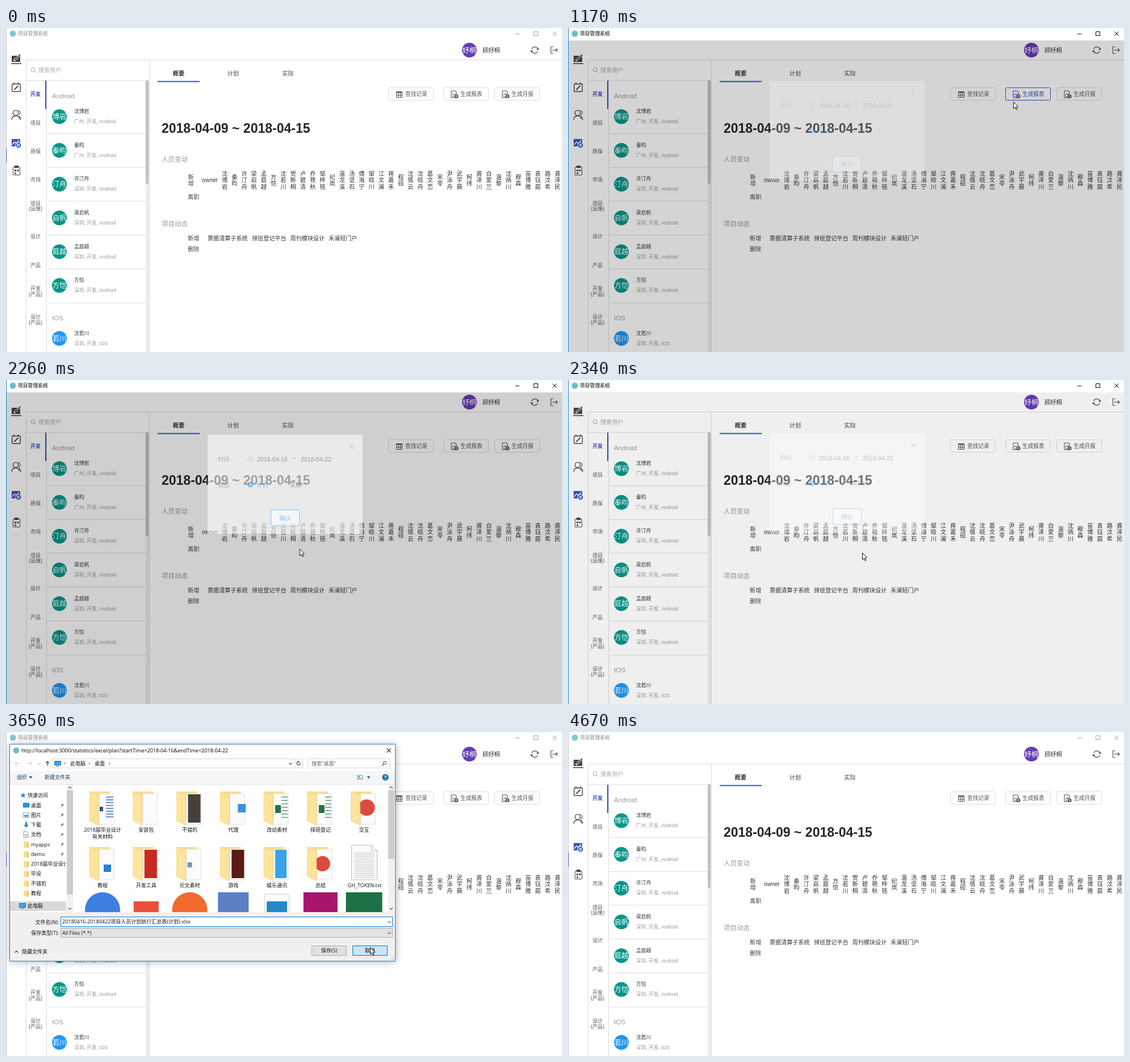
Animation, 979 px wide and 572 px high, one loop 4820 ms. Source, as an HTML page with a canvas:

```html
<!DOCTYPE html>
<html lang="zh-CN">
<head>
<meta charset="utf-8">
<title>项目管理系统</title>
<style>
html, body { margin: 0; width: 100%; height: 100%; overflow: hidden; background: #fff; }
canvas { display: block; }
</style>
</head>
<body>
<canvas id="stage" width="979" height="572"></canvas>
<script>
const LOOP = 4820, W = 979, H = 572;
const g = document.getElementById('stage').getContext('2d');
const CJK = '"Noto Sans CJK SC","Noto Sans CJK",sans-serif';
const APP = '"Liberation Sans",' + CJK, SYS = '"Open Sans",' + CJK;
const INDIGO = '#3f51b5', BLUE = '#409eff', RULE = '#dcdcdc';

// ---- drawing helpers ----
function text(s, x, y, size, color, o = {}) {
  g.font = (o.bold ? 'bold ' : '') + size + 'px ' + (o.font || APP);
  g.textAlign = o.align || 'left';
  g.fillStyle = color;
  g.fillText(s, x, y + size * 0.37);
}
const mid = (s, x, y, size, color, o) => text(s, x, y, size, color, { align: 'center', ...o });
const sys = (s, x, y, color = '#111', align = 'left') => text(s, x, y, 9, color, { font: SYS, align });

function fill(x, y, w, h, color) {
  g.fillStyle = color;
  g.fillRect(x, y, w, h);
}
function frame(x, y, w, h, color, bg, r = 0) {
  g.beginPath();
  g.roundRect(x + 0.5, y + 0.5, w - 1, h - 1, r);
  if (bg) { g.fillStyle = bg; g.fill(); }
  g.lineWidth = 1;
  g.strokeStyle = color;
  g.stroke();
}
function path(pts, stroke, width = 1, bg, close) {
  g.beginPath();
  for (let i = 0; i < pts.length; i += 2) g.lineTo(pts[i], pts[i + 1]);
  if (close || bg) g.closePath();
  if (bg) { g.fillStyle = bg; g.fill(); }
  if (stroke) { g.strokeStyle = stroke; g.lineWidth = width; g.stroke(); }
}
function disc(x, y, r, color) {
  g.beginPath();
  g.arc(x, y, r, 0, 7);
  g.fillStyle = color;
  g.fill();
}
function ring(x, y, r, color, width = 1, a = 0, b = Math.PI * 2) {
  g.beginPath();
  g.arc(x, y, r, a, b);
  g.strokeStyle = color;
  g.lineWidth = width;
  g.stroke();
}
function cross(x, y, r, color, width = 1) {
  path([x - r, y - r, x + r, y + r], color, width);
  path([x + r, y - r, x - r, y + r], color, width);
}
// chevron pointing down (d = 1) or up (d = -1)
const chevron = (x, y, r, color, d = 1) =>
  path([x - r, y - d * r / 2, x, y + d * r / 2, x + r, y - d * r / 2], color, 1.1);
const right = (x, y, color) => path([x - 1, y - 2, x + 1, y, x - 1, y + 2], color);
const caret = (x, y) => path([x - 3, y - 1.5, x + 3, y - 1.5, x, y + 2], null, 1, '#1e395b');

// ---- timing ----
const clamp = v => Math.max(0, Math.min(1, v));
const smooth = v => (v = clamp(v), v * v * (3 - 2 * v));
const tick = (t, a, b, n) =>
  t < a ? -1 : Math.min(n - 1, Math.floor((t - a) / (b - a) * (n - 1) + 0.15));
const opening = t => tick(t, 930, 1410, 7);
const closing = t => tick(t, 2090, 2560, 7);
const saving = t => tick(t, 2650, 3100, 7);

// start, end, steps, step of arrival, from x y, to x y, sag
const LEGS = [
  [70, 550, 7, 6, 876, 367, 784, 130, 0],
  [1480, 1940, 7, 5, 784, 130, 507, 242, 0],
  [2090, 2560, 7, 3, 507, 242, 518, 305, 0],
  [2650, 3100, 7, 2, 518, 305, 503, 319, 0],
  [3190, 3650, 7, 6, 506, 327, 641, 380, 24],
  [3780, 4120, 6, 5, 641, 380, 918, 557, 0],
  [4270, 4440, 3, 2, 918, 562, 918, 576, 0]
];
function pointer(t) {
  const leg = LEGS.filter(l => t >= l[0]).pop();
  if (!leg) return null;
  const [a, b, n, reach, x0, y0, x1, y1, sag] = leg;
  const u = clamp(tick(t, a, b, n) / reach), p = u * (2 - u);
  return { x: x0 + (x1 - x0) * p, y: y0 + (y1 - y0) * p + sag * Math.sin(Math.PI * p) };
}

// ---- application window ----
const NAMES = ('沈博岩 秦昀 许汀舟 梁启帆 孟庭越 方恺 沈若川 贺新桐 卢碧清 乔艳秋 邹梓铭 纪岚 ' +
  '温龙溪 汤坚石 傅海宁 邹晓川 江文澜 蒋嘉禾 程砚 沈倩云 沈晓舟 葛文峦 宋苓 尹泳舟 武宇晨 柯纬 ' +
  '龚泽川 白爱兰 温黎 沈炳川 穆森 苗博雅 袁钰庭 路汶希 龚泽民').split(' ');
const GROUPS = ['开发', '项目', '质保', '市场', '项目 (运维)', '设计', '产品', '开发 (产品)', '设计 (产品)'];

function titleBar(active) {
  const c = active ? '#000' : '#a0a0a0';
  fill(0, 0, W, 22, '#fff');
  disc(12, 10, 5.5, active ? '#6cbcc6' : '#84c6cd');
  text('项目管理系统', 21, 10, 8.8, active ? '#000' : '#888');
  path([897, 10.5, 904, 10.5], c);
  frame(929, 6, 8, 8, c);
  cross(966, 10, 3.7, c);
  fill(0, 0, 1, H, active ? '#1883d7' : '#c8c8c8');
  if (!active) fill(0, 213, 1, 25, INDIGO);
}

function sideIcons() {
  const c = '#444';
  fill(10, 49, 15, 11, c);
  fill(9, 62, 18, 1.6, c);
  path([14, 58, 24, 48], '#fff', 3.5);
  path([15, 57, 25, 47], c, 1.8);

  g.beginPath(); g.roundRect(10.7, 98.7, 14.6, 13.6, 1.5);
  g.strokeStyle = c; g.lineWidth = 1.4; g.stroke();
  path([14, 96, 14, 100], c, 1.4);
  path([22, 96, 22, 100], c, 1.4);
  path([14.5, 109, 21.5, 102], c, 1.8);

  ring(17, 150, 4.6, c, 1.4);
  ring(17, 162, 7, c, 1.4, Math.PI, Math.PI * 1.95);
  ring(20.5, 150, 4.4, c, 1.2, -1.4, 1.3);
  path([22, 155.5, 25, 158, 26, 162], c, 1.3);

  fill(10, 196, 15, 13, INDIGO);
  path([11, 206, 15, 201, 18, 204, 23, 198], '#fff', 1.4);
  disc(22, 207, 5.5, '#fff');
  ring(22, 207, 3.4, INDIGO, 2);
  disc(22, 207, 1, INDIGO);

  frame(12, 245, 13, 15, c, null, 1);
  frame(12, 245, 13, 15, c, null, 1);
  fill(15, 243, 7, 4, c);
  fill(15, 250, 3, 3, c);
  fill(19.5, 250, 3, 3, c);
  fill(15, 255, 3, 2.5, c);
}

function person(y, name, place, color) {
  disc(94, y, 13, color);
  mid(name.slice(-2), 94, y, 12.2, '#fff');
  text(name, 120, y - 9.5, 8.8, '#333');
  text(place, 120, y + 8.5, 8.65, '#999');
}

function report(x, y, c) {
  path([x + 3, y + 6, x - 5, y + 6, x - 5, y - 6, x + 2, y - 6, x + 4, y - 4, x + 4, y], c, 1.1);
  path([x - 3, y + 2, x - 1, y - 1, x, y + 1, x + 2, y - 2], c, 0.9);
  path([x - 3, y + 4, x, y + 4], c, 0.9);
  disc(x + 4, y + 3.5, 3.6, c);
  path([x + 4, y + 5.5, x + 4, y + 2], '#fff', 1);
  path([x + 2.5, y + 3.5, x + 4, y + 1.8, x + 5.5, y + 3.5], '#fff', 0.8);
}
function button(x, w, label, hot, icon) {
  const c = hot ? INDIGO : '#555';
  frame(x, 105, w, 23, hot ? INDIGO : RULE, '#fff', 2);
  text(label, x + 30, 116.5, 9.7, c);
  icon(x + 19, 117, c);
}
function grid(x, y, c) {
  frame(x - 5, y - 5, 11, 11, c);
  fill(x - 5, y - 5, 11, 2.5, c);
  path([x - 5, y + 1.5, x + 6, y + 1.5], c);
  path([x - 1, y - 4, x - 1, y + 5], c);
  path([x + 2.5, y - 4, x + 2.5, y + 5], c);
}

function app(hot) {
  fill(0, 0, W, H, '#fff');
  sideIcons();
  fill(36, 56, W - 36, 1, RULE);
  fill(35, 56, 1, H, RULE);
  fill(36, 92, 216, 1, RULE);
  fill(71, 92, 1, H, RULE);
  fill(252, 56, 1, H, RULE);

  disc(816, 39, 13, '#673ab7');
  mid('妤桐', 816, 39, 12.3, '#fff');
  text('顾妤桐', 839, 39, 10.3, '#333');
  ring(931, 39, 5.7, '#555', 1.2, -2.8, -0.2);
  ring(931, 39, 5.7, '#555', 1.2, 0.35, 2.95);
  path([934, 38.5, 938.5, 38.5, 937.5, 34.5], null, 1, '#555');
  path([928, 39.5, 923.5, 39.5, 924.5, 43.5], null, 1, '#555');
  path([964, 33, 959.5, 33, 959.5, 45, 964, 45], '#555', 1.2);
  path([962, 39, 971, 39], '#555', 1.2);
  path([968, 36, 971, 39, 968, 42], '#555', 1.2);

  ring(47.5, 73.5, 3.4, '#aaa');
  path([50, 76, 53, 79], '#aaa');
  text('搜索用户', 57, 74.5, 10.1, '#aaa');

  GROUPS.forEach((s, i) => {
    const y = 117 + i * 50.2, rows = s.split(' '), c = i ? '#555' : INDIGO;
    if (rows.length < 2) mid(s, 52, y, 9, c, { bold: !i });
    else rows.forEach((r, j) => mid(r, 52, y - 8.5 + j * 9.6, 9, c));
  });
  fill(69, 93, 2, 50, INDIGO);

  text('Android', 81, 120, 11.6, '#999');
  for (let i = 0; i < 6; i++) {
    person(156.5 + i * 59.6, NAMES[i], (i < 2 ? '广州' : '深圳') + ', 开发, Android', '#009688');
    fill(74, Math.round(186 + i * 59.7), 172, 1, RULE);
  }
  text('IOS', 81, 511.5, 11.6, '#999');
  person(548, NAMES[6], '深圳, 开发, IOS', '#2196f3');
  fill(246, 93, 6, H, '#ededed');
  fill(246, 93, 5, 182, '#c1c1c1');

  mid('概要', 304, 80, 10.2, '#333', { bold: true });
  mid('计划', 400, 80, 10.2, '#444');
  mid('实际', 496.5, 80, 10.2, '#444');
  fill(267, 93.5, 74, 2, INDIGO);
  button(673, 80, '查找记录', false, grid);
  button(770, 80, '生成报表', hot, report);
  button(860, 80, '生成月报', false, report);

  text('2018-04-09 ~ 2018-04-15', 274, 176, 23, '#262626', { bold: true });
  text('人员变动', 274, 232, 11.5, '#999');
  mid('新', 325.5, 263, 10.2, '#444');
  mid('增', 325.5, 274, 10.2, '#444');
  text('owner', 345, 268, 10.3, '#333');
  NAMES.forEach((s, i) => [...s].forEach((ch, j) =>
    mid(ch, 385 + i * 17.235, 268.5 + (j - (s.length - 1) / 2) * 11.4, 10.2, '#333')));
  text('离职', 320, 298, 10.2, '#444');

  text('项目动态', 274, 346, 11.5, '#999');
  text('新增', 320, 371, 10.2, '#444');
  text('票据清算子系统', 355, 371, 10.1, '#333');
  text('排班登记平台', 433, 371, 10.1, '#333');
  text('周刊模块设计', 500.5, 371, 10.1, '#333');
  text('禾澜轻门户', 568, 371, 10.1, '#333');
  text('删除', 320, 390, 10.2, '#444');
}

// ---- report popup ----
function popup(alpha, dy) {
  g.save();
  g.globalAlpha = alpha;
  g.translate(0, dy);
  fill(355, 104, 273, 175, '#fff');
  cross(608, 124.5, 3.5, '#909399');
  text('时间', 373, 147, 10.3, '#888');
  ring(430, 147, 4.3, '#b8bcc4');
  path([430, 144.5, 430, 147.5, 432.5, 147.5], '#b8bcc4');
  text('2018-04-16', 442, 147.5, 10.5, '#606266');
  mid('~', 507.5, 145, 10.5, '#606266');
  text('2018-04-22', 519, 147.5, 10.5, '#606266');
  text('类型', 373, 192, 10.3, '#888');
  disc(430, 192, 5, BLUE);
  disc(430, 192, 1.7, '#fff');
  text('计划', 441, 192, 10.3, BLUE);
  ring(489, 192, 4.6, '#dcdfe6');
  text('实际', 500, 192, 10.3, '#606266');
  frame(466, 236, 51, 29, BLUE, '#fff', 3);
  mid('确认', 491.5, 251, 10.3, BLUE);
  g.restore();
}

// ---- save dialog ----
const PLACES = ['桌面', '图片', '下载', '文档', 'myapps', 'demo', '2018届毕业设计', '毕设', '不错的', '教程'];
const FILES = ['2018届毕业设计 有关材料', '安装包', '不错的', '代理', '改动素材', '排班登记', '交互',
  '教程', '开发工具', '论文素材', '游戏', '娱乐通讯', '总结'];
// colour, offset x y, width, height (no height: a disc)
const INSIDE = [['#2b579a', -5, 27, 6, 8], null, ['#4a403b', -3, 5, 22, 50], ['#3f8fdc', 8, 22, 14, 15],
  ['#217346', -3, 24, 10, 14], ['#217346', -3, 24, 10, 14], ['#dd4b3e', -10, 14, 29],
  ['#2b7cd3', 2, 31, 13, 13], ['#c9281f', -3, 5, 22, 50], ['#7b93b5', -4, 27, 8, 9],
  ['#5c1a1a', -3, 5, 22, 50], ['#3aa2ea', -3, 5, 20, 50], ['#dd4b3e', -10, 16, 27]];
const LAST_ROW = [['c', '#3d80df', 31], ['s', '#e8503a', 22], ['c', '#f26a2e', 31], ['s', '#5b80c4', 27],
  ['s', '#2489ca', 18], ['s', '#a8156c', 30], ['s', '#1e7145', 32]];

function folder(cx, y, item) {
  fill(cx - 23, y, 36, 52, '#f7dd92');
  path([cx - 6, y + 4, cx + 20, y + 4, cx + 20, y + 58, cx - 6, y + 58], '#dedede', 1, '#fbfbfb');
  if (item) {
    const [color, dx, dy, w, h] = item;
    if (h) fill(cx + dx, y + dy, w, h, color);
    else disc(cx + dx + w / 2, y + dy + w / 2, w / 2, color);
  }
  path([cx - 23, y, cx - 7, y + 8, cx - 7, y + 60, cx - 23, y + 52], '#f2cf72', 0.6, '#fce49b');
}
// rows of text on a sheet
function lines(x, y, n, gap, w, color) {
  for (let j = 0; j < n; j++) fill(x, y + j * gap, w, 1.5, color);
}
function page(x, y) {
  path([x - 4, y - 5.5, x + 1, y - 5.5, x + 4, y - 2.5, x + 4, y + 5.5, x - 4, y + 5.5], '#999', 1, '#fff');
}
function computer(x, y) {
  frame(x - 6, y - 5, 12, 8, '#2472a8', '#35a7ee');
  fill(x - 3, y + 4, 6, 1, '#567');
}
function placeIcon(i, y) {
  if (i === 0) frame(30, y - 4, 11, 8, '#0d6cb5', '#1f97ea');
  else if (i === 1) { frame(30, y - 4, 11, 9, '#8a9aa8', '#fff'); fill(32, y, 7, 3, '#3f8fc4'); }
  else if (i === 2) path([34, y - 5, 37, y - 5, 37, y, 40, y, 35.5, y + 5, 31, y, 34, y], null, 1, '#2b82d4');
  else if (i === 3) { page(35, y); path([33, y, 37, y], '#3f8fc4'); path([33, y + 2.5, 37, y + 2.5], '#3f8fc4'); }
  else { fill(31, y - 5, 9, 11, '#fbdf94'); fill(37, y - 3, 3, 9, '#f0c965'); }
}
function pin(x, y) {
  path([x - 3, y + 3, x, y], '#888');
  path([x - 2, y - 1, x + 1, y + 2], '#888', 1.3);
  path([x - 0.5, y + 0.5, x + 2, y - 2], '#888', 2.5);
}
function star(x, y, r) {
  const pts = [];
  for (let i = 0; i < 10; i++) {
    const a = i * Math.PI / 5 - Math.PI / 2, d = i % 2 ? r * 0.45 : r;
    pts.push(x + d * Math.cos(a), y + d * Math.sin(a));
  }
  path(pts, null, 1, '#2f86d6');
}

function places(ready) {
  const y0 = ready ? 112 : 111;
  g.save();
  g.beginPath(); g.rect(7, 93, 99, 225); g.clip();
  star(30, y0, 5);
  sys('快速访问', 38, y0);
  PLACES.forEach((s, i) => {
    const y = y0 + 17.25 * (i + 1);
    ready ? placeIcon(i, y) : page(35, y);
    sys(s, 44, y);
    if (i < 6) pin(99, y);
  });
  fill(7, 299, 99, 17, '#d9d9d9');
  computer(29, 307);
  sys('此电脑', 38, 307);
  g.restore();
  fill(107, 92, 11, 226, '#f0f0f0');
  fill(107, 103, 11, 184, '#cdcdcd');
  chevron(112.5, 98, 2.6, '#444', -1);
  chevron(112.5, 312, 2.6, '#444');
}

function files() {
  const col = i => 170 + i * 76.75;
  g.save();
  g.beginPath(); g.rect(119, 93, 554, 225); g.clip();
  FILES.forEach((s, i) => {
    const x = col(i % 7), y = i < 7 ? 105 : 203;
    folder(x, y, INSIDE[i]);
    if (i === 0) lines(x + 6, y + 9, 8, 5, 13, '#4472c4');
    if (i === 4 || i === 5) lines(x + 8, y + 9, 7, 6, 11, '#5b9b76');
    s.split(' ').forEach((r, j) => sys(r, x, y + 68 + j * 12, '#111', 'center'));
  });
  const x = col(6);
  path([x - 22, 200, x + 13, 200, x + 23, 210, x + 23, 261, x - 22, 261], '#bbb', 1, '#fafafa');
  path([x + 13, 200, x + 13, 210, x + 23, 210], '#bbb');
  lines(x - 17, 213, 14, 3.3, 35, '#d4d4d4');
  sys('GH_TOKEN.txt', x + 1, 271, '#111', 'center');
  frame(col(4) - 22, 286, 44, 40, '#ccc', '#fff');
  LAST_ROW.forEach(([kind, color, r], i) => {
    const cx = col(i), y = i === 4 || i === 1 ? 299 : 283;
    if (kind === 'c') disc(cx, y + r, r, color);
    else fill(cx - r, y, r * 2, r * 2, color);
  });
  g.restore();
}

function toolbars() {
  const dim = '#c4c4c4', dark = '#444';
  path([24, 55.5, 16, 55.5], dim);
  path([19, 52, 16, 55.5, 19, 59], dim);
  path([37, 55.5, 45, 55.5], dim);
  path([42, 52, 45, 55.5, 42, 59], dim);
  chevron(58.5, 56, 2, dim);
  path([73, 60, 73, 52], dark, 1.2);
  path([70, 55, 73, 52, 76, 55], dark, 1.2);
  frame(82, 47, 441, 17, '#d9d9d9', '#fff');
  computer(91, 56);
  [103, 147, 182].forEach(x => right(x, 55.5, dark));
  sys('此电脑', 113, 55.5);
  sys('桌面', 156, 55.5);
  chevron(501, 56, 2.8, dark);
  fill(508, 48, 1, 15, '#d9d9d9');
  ring(515, 55.5, 3, dark, 1.1, -0.6, 4.6);
  path([514, 50.5, 517, 52.5, 514, 54], null, 1, dark);
  frame(531, 47, 145, 17, '#d9d9d9', '#fff');
  sys('搜索"桌面"', 538, 55.5, '#666');
  ring(667, 54.5, 2.7, dark);
  path([665, 56.5, 662, 59.5], dark, 1.2);

  fill(7, 69, 678, 23, '#f5f6f7');
  fill(7, 92, 678, 1, '#e2e2e2');
  sys('组织', 19, 80, '#1e395b');
  caret(43.5, 80);
  sys('新建文件夹', 68, 80, '#1e395b');
  frame(618, 76, 10, 8, '#7a8ea3', '#fff');
  fill(620, 78, 3, 2, '#2b82d4');
  fill(620, 81, 6, 1, '#7a8ea3');
  caret(638.5, 80);
  disc(668, 80, 5.7, '#1173b5');
  mid('?', 668, 80, 9, '#fff', { bold: true });
}

function form(p) {
  const inside = (x, y, w, h) => p && p.x >= x && p.x <= x + w && p.y >= y && p.y <= y + h;
  const push = (x, label) => {
    const on = inside(x, 376, 62, 18);
    frame(x, 377, 62, 18, on ? '#0078d7' : '#adadad', on ? '#cce4f7' : '#e1e1e1');
    sys(label, x + 31, 386, '#111', 'center');
  };
  fill(7, 318, 678, 86, '#f0f0f0');
  sys('文件名(N):', 93, 335.5, '#111', 'right');
  frame(96, 326, 585, 18, '#0078d7', '#fff');
  sys('20180416-20180422项目人员计划执行汇总表(计划).xlsx', 99, 335);
  chevron(675, 335.5, 2.6, '#555');
  sys('保存类型(T):', 93, 355, '#111', 'right');
  const over = inside(96, 346, 585, 17);
  frame(96, 346, 585, 17, over ? '#0078d7' : '#adadad', over ? '#e5f1fb' : '#e3e3e3');
  sys('All Files (*.*)', 99, 355);
  chevron(675, 355, 2.6, '#555');
  chevron(18.5, 388, 3, '#333', -1);
  sys('隐藏文件夹', 28, 388);
  push(538, '保存(S)');
  push(610, '取消');
  for (let r = 0; r < 3; r++)
    for (let c = 0; c < 3 - r; c++) fill(682 - c * 2.5, 401 - r * 2.5, 1.2, 1.2, '#aaa');
}

function saveDialog(stage, alpha, p) {
  g.save();
  g.globalAlpha = alpha;
  g.save();
  g.shadowColor = 'rgba(0,0,0,.3)';
  g.shadowBlur = 12;
  g.shadowOffsetX = 1;
  g.shadowOffsetY = 1;
  fill(6, 21, 680, 384, '#fff');
  g.restore();
  disc(18, 32.5, 5.3, '#6cbcc6');
  sys('http://localhost:3000/statistics/excel/plan?startTime=2018-04-16&endTime=2018-04-22', 27, 33, '#000');
  cross(674, 32.5, 3.7, '#222', 1.1);
  if (stage > 0) places(stage > 1);
  if (stage > 1) {
    toolbars();
    files();
    fill(673, 93, 11, 225, '#f0f0f0');
    fill(673, 103, 11, 121, '#cdcdcd');
    chevron(678.5, 98, 2.6, '#444', -1);
    chevron(678.5, 312, 2.6, '#444');
    form(p);
  } else {
    fill(7, 365, 678, 39, '#f0f0f0');
    fill(13, 380, 72, 15, '#fff');
    fill(537, 377, 64, 18, '#fff');
    fill(609, 377, 64, 18, '#fff');
    if (stage > 0) {
      fill(673, 103, 11, 203, '#f0f0f0');
      fill(673, 103, 11, 121, '#cdcdcd');
      sys('正在处理它...', 378, 108, '#666');
    }
  }
  frame(6, 21, 680, 384, '#2d7fbd');
  g.restore();
}

// ---- cursors ----
const ARROW = [0, 0, 0, 11.7, 2.7, 9.2, 4.6, 13.5, 6.4, 12.7, 4.6, 8.5, 8.2, 8.3];
const HAND = [-1, 0, 1, 0, 1.6, 5.5, 6.5, 6.5, 8, 8, 7.5, 12, 6, 16.5, 0, 16.5, -3.5, 11, -4, 8.5, -2.5, 8.2, -1, 10];
function drawPointer(p, hand) {
  g.save();
  g.translate(p.x + 0.5, p.y + 0.5);
  path(hand ? HAND : ARROW, '#111', 1, '#fff');
  if (hand) [2.4, 4.6].forEach(x => path([x, 7, x, 10], '#111', 0.8));
  g.restore();
}

function draw(t) {
  const p = pointer(t), o = opening(t), c = closing(t), s = saving(t);
  app(t >= 470 && t < 2090);

  if (o >= 0 && s < 0) {
    const leaving = c >= 0;
    const shade = leaving ? 1 - smooth((c + 1) / 5.15) : smooth((o - 1.1) / 4.9);
    const shown = leaving ? 1 - smooth((c + 1) / 6.7) : t >= 1480 ? 1 : smooth((o - 1.6) / 4.6);
    const dy = leaving ? -16 * (c + 1) / 6.7 : Math.min(0, -3.5 * (6 - o));
    fill(0, 22, W, H, `rgba(0,0,0,${0.5 * shade})`);
    if (shown > 0) popup(shown, dy);
  }

  titleBar((t >= 930 && t < 2560) || (t >= 3780 && t < 4670));
  if (s >= 0 && t < 3850) {
    const stage = s < 2 ? 0 : s < 4 ? 1 : 2;
    saveDialog(stage, s === 0 || t >= 3780 ? 0.5 : 1, p);
  }
  if (p) drawPointer(p, t >= 1850 && t < 2090);
}

const start = performance.now();
(function loop() {
  draw((performance.now() - start) % LOOP);
  requestAnimationFrame(loop);
})();
</script>
</body>
</html>
```
